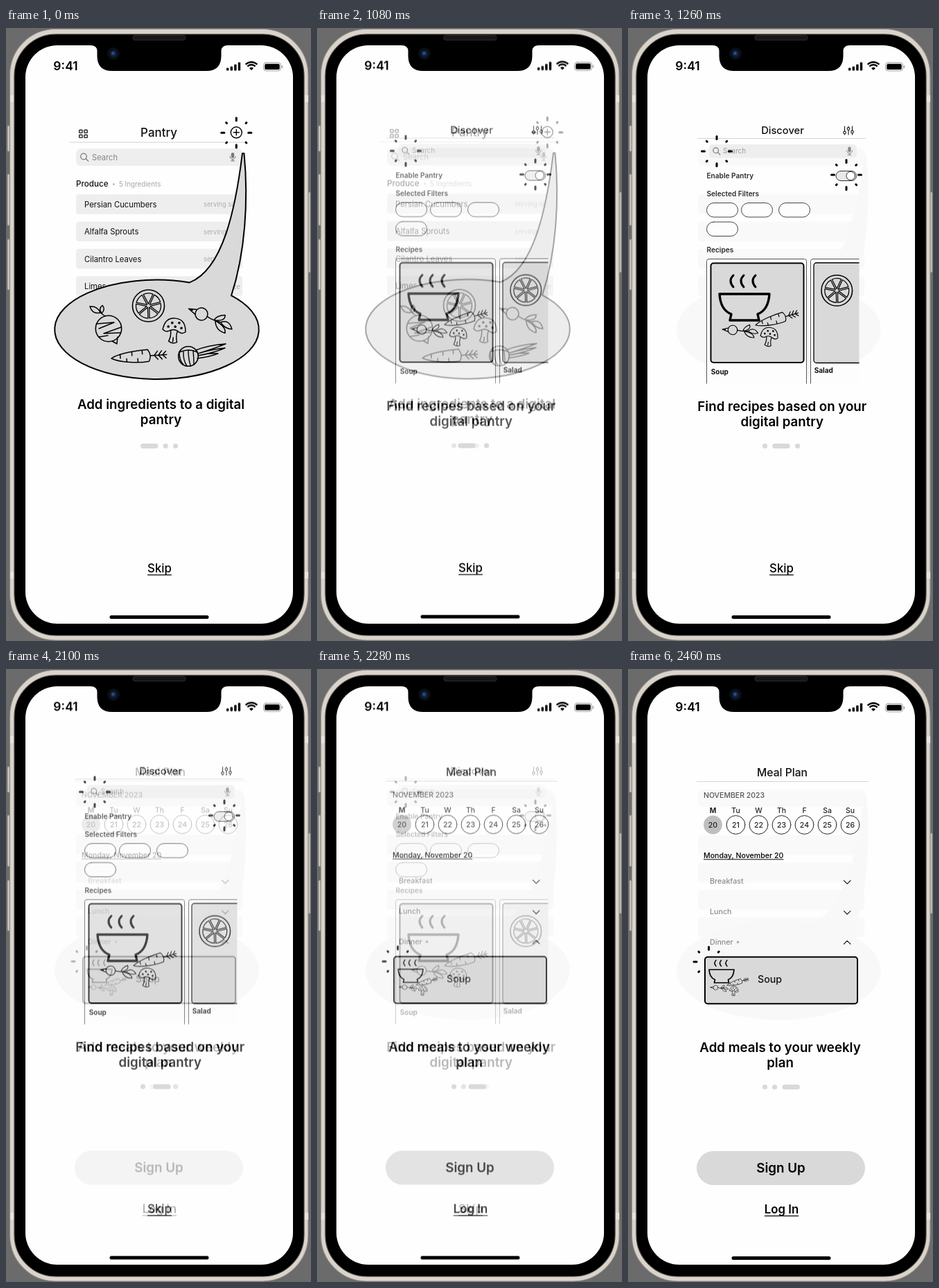
Write an HTML page with a canvas that moves like this. It is 440 px wide and 885 px high and loops after 4.5 s.

```html
<!DOCTYPE html>
<html lang="en">
<head>
<meta charset="utf-8">
<title>Pantry onboarding</title>
<style>
html, body { margin: 0; width: 100%; height: 100%; overflow: hidden; background: #6b6b6b; }
canvas { display: block; width: 440px; height: 885px; }
</style>
</head>
<body>
<canvas id="stage"></canvas>
<script>
const W = 440, H = 885, LOOP = 4500, TAU = Math.PI * 2;
const GREY = '#d9d9d9';
const scale = window.devicePixelRatio || 1;
const start = performance.now();
// Time and page position: the whole part is the page, the fraction is the dissolve.
const CUTS = [
  [0, 0], [1020, .32], [1080, .66], [1140, .86], [1200, .95], [1260, 1],
  [2100, 1.28], [2160, 1.45], [2220, 1.6], [2280, 1.72], [2400, 1.93], [2460, 2]
];
let c;

function setup(canvas) {
  canvas.width = W * scale;
  canvas.height = H * scale;
  const ctx = canvas.getContext('2d');
  ctx.scale(scale, scale);
  return ctx;
}

function layer(draw) {
  const canvas = document.createElement('canvas');
  c = setup(canvas);
  c.lineCap = c.lineJoin = 'round';
  draw();
  return canvas;
}

function text(s, x, y, size, weight = 400, color = '#000', align = 'left') {
  c.font = `${weight} ${size}px Inter, sans-serif`;
  c.textAlign = align;
  c.fillStyle = color;
  c.fillText(s, x, y);
}

function underline(s, x, y, size, weight, align, gap, thick) {
  text(s, x, y, size, weight, '#000', align);
  const w = c.measureText(s).width;
  c.fillRect(align === 'center' ? x - w / 2 : x, y + gap, w, thick);
}

function paint(fill, stroke, width = 1) {
  if (fill) { c.fillStyle = fill; c.fill(); }
  if (stroke) { c.strokeStyle = stroke; c.lineWidth = width; c.stroke(); }
}

function box(x1, y1, x2, y2, r, fill, stroke, width) {
  c.beginPath();
  c.roundRect(x1, y1, x2 - x1, y2 - y1, r);
  paint(fill, stroke, width);
}

function disc(x, y, r, fill, stroke, width) {
  c.beginPath();
  c.arc(x, y, r, 0, TAU);
  paint(fill, stroke, width);
}

function path(d, fill, stroke = '#000', width = 1.5) {
  const p = new Path2D(d);
  if (fill) { c.fillStyle = fill; c.fill(p); }
  if (stroke) { c.strokeStyle = stroke; c.lineWidth = width; c.stroke(p); }
}

function at(x, y, turn, size, draw) {
  c.save();
  c.translate(x, y);
  c.rotate(turn);
  c.scale(size, size);
  draw();
  c.restore();
}

function rays(x, y) {
  for (let i = 0; i < 8; i++) {
    at(x, y, i * Math.PI / 4, 1, () =>
      path(i % 2 ? 'M19.5 0H20.7' : 'M17.5 0H21.5', null, '#000', 3));
  }
}

function magnifier(x, y, r, color) {
  disc(x, y, r, null, color, 1.2);
  path(`M${x + r * .75} ${y + r * .75}l${r * .85} ${r * .85}`, null, color, 1.2);
}

function mic(x, y, color) {
  box(x - 2.2, y - 6, x + 2.2, y + 1.8, 2.2, color);
  path(`M${x - 4} ${y - .5}a4 4 0 0 0 8 0M${x} ${y + 3.6}v2.2M${x - 2.5} ${y + 5.8}h5`, null, color, 1);
}

// Food drawings

function orange() {
  disc(0, 0, 23, null, '#000', 1.6);
  for (let i = 0; i < 7; i++) {
    at(0, 0, i * TAU / 7 + .2, 1, () => {
      c.beginPath();
      c.moveTo(2.6, 0);
      c.arc(0, 0, 18, -.39, .39);
      c.closePath();
      paint(null, '#000', 1.3);
    });
  }
}

function radish() {
  path('M-20 0L-8.5 -3.5M-20 0L-8 4M-20 0H-14');
  disc(0, 0, 9, null, '#000', 1.5);
  path('M9 0Q20 2 30 0M20 1Q21 -7 32 -12Q36 -3 20 1ZM22 1Q28 14 42 12Q40 3 22 1ZM30 0Q40 -9 49 3Q39 7 30 0Z');
}

function mushroom() {
  path('M-16.5 0Q-15 -18 0 -18Q15 -18 16.5 0Q12 4 7 1Q0 -4 -7 1Q-12 4 -16.5 0Z');
  path('M-5 0Q-3 8 -6 16Q0 20 6 16Q3 8 5 0M0 10V16');
  for (const [x, y] of [[-9, -5], [-4, -11], [1, -6], [6, -12], [10, -5]]) disc(x, y, 1.8, '#000');
}

function carrot() {
  path('M0 0C12 -7 40 -9 53 -9Q59 0 54 8C40 10 12 7 0 0ZM13 -5V1M22 7V2M30 -7V-2M38 8V3M45 -8V-3');
  path('M57 0H80M62 0l5 -6M62 0l5 6M68 0l5 -6M68 0l5 6M74 0l5 -5M74 0l5 5');
}

function beet() {
  path('M153 452L160 456L161 446');
  disc(148, 434, 18.7, null, '#000', 1.6);
  path('M143 416L136 411Q125 414 121 402Q132 401 136 411M138 412Q133 405 139 400.5Q144 406 138 412');
  path('M131 427L156 425L134 434M166 432L141 441L165 440M134 446L147 444', null, '#000', 1.5);
}

function onion() {
  disc(263, 474, 14.3, null, '#000', 1.6);
  path('M250 468Q264 462 276 468M250 468Q250 480 256 486M256 466Q255 479 261 488M263 465Q263 477 266 487M270 466Q271 477 271 485', null, '#000', 1.4);
  path('M274 465Q292 458 317 456Q300 463 277 470M277 470Q296 464 316 462Q300 469 277 473M277 473Q292 469 306 470Q293 475 276 477', null, '#000', 1.4);
}

function soup() {
  for (const x of [152, 167, 184]) path(`M${x} 357Q${x - 8} 365 ${x} 374`, null, '#000', 3);
  path('M132 384H204C203 399 198 409 187 413L189 422H147L149 413C138 409 133 399 132 384Z', null, '#000', 3.4);
  at(184, 429, -.28, .8, carrot);
  at(151, 436, .06, .75, radish);
  at(203.5, 446, .15, .76, mushroom);
}

function bubble(fill, stroke) {
  c.beginPath();
  c.ellipse(217.5, 435.3, 147.3, 71.7, 0, -.75, TAU - 1.243);
  c.bezierCurveTo(313, 348, 331, 262, 341, 181);
  c.lineTo(343.5, 181);
  c.bezierCurveTo(350, 250, 345, 325, 325, 386.5);
  c.closePath();
  paint(fill, stroke, 2);
}

const ROWS = ['Persian Cucumbers', 'Alfalfa Sprouts', 'Cilantro Leaves', 'Limes'];

function rowBoxes(fill) {
  box(101, 174, 341, 199, 7, fill);
  ROWS.forEach((_, i) => box(101, 240 + i * 39.4, 341, 268.7 + i * 39.4, 4, fill));
}

// Page parts

function statusBar() {
  text('9:41', 86, 61.3, 17.5, 600, '#000', 'center');
  [4, 6, 9, 12].forEach((h, i) => box(318 + i * 5.6, 61.5 - h, 321.4 + i * 5.6, 61.5, 1, '#000'));
  for (const r of [4.2, 8, 11.8]) {
    c.beginPath();
    c.arc(354, 61, r, -Math.PI * .75, -Math.PI * .25);
    if (r < 5) { c.lineTo(354, 61); paint('#000'); }
    else { c.lineCap = 'butt'; paint(null, '#000', 2.4); c.lineCap = 'round'; }
  }
  box(371.5, 50, 396.5, 61.8, 3.6, null, '#9a9a9a', 1);
  box(373.2, 51.7, 394.8, 60.1, 2.2, '#000');
  box(397.8, 54, 399.2, 58, 1, '#9a9a9a');
}

function base(index, title, x, y) {
  c.fillStyle = '#fefefe';
  c.fillRect(0, 0, W, H);
  if (index) { rowBoxes('#f9f9f9'); bubble('#f8f8f8'); }
  statusBar();
  title.forEach((line, i) => text(line, x, y + i * 22.7, 18.7, 600, '#000', 'center'));
  for (let k = 0; k < 3; k++) {
    if (k !== index) disc(k < index ? 197.5 + 14 * k : 215.8 + 14.4 * k, 603.5, 3.6, GREY);
  }
  if (index < 2) underline('Skip', 221.5, 786, 16.8, 500, 'center', 3, 1.2);
  box(149.5, 848, 292.5, 853, 2.5, '#000');
}

function rule(x1, x2, y) {
  c.fillStyle = '#d4d4d4';
  c.fillRect(x1, y, x2 - x1, 1);
}

function pantry() {
  base(0, ['Add ingredients to a digital', 'pantry'], 223.5, 549.7);
  rule(92, 345, 164.5);
  for (const x of [105.7, 112.9]) for (const y of [147.2, 154.2]) box(x, y, x + 4.4, y + 4.2, .8, null, '#222', 1.4);
  text('Pantry', 220.5, 157, 16.9, 500, '#111', 'center');
  rowBoxes('#eee');
  magnifier(112, 185.5, 4.3, '#777');
  text('Search', 124, 190.5, 11.2, 400, '#858585');
  mic(327, 186, '#777');
  text('Produce', 101, 228.7, 11.7, 500, '#111');
  disc(155.5, 225.5, 1.5, '#bbb');
  text('5 Ingredients', 163, 228.5, 9.8, 400, '#a6a6a6');
  ROWS.forEach((name, i) => {
    const y = 258.7 + i * 39.4;
    text(name, 113, y, 11.3, 400, '#111');
    text('serving size', 285, y - .4, 9.3, 400, '#adadad');
  });
  bubble(GREY, '#000');
  rays(332.3, 151.3);
  disc(332.3, 150.8, 8, null, '#000', 1.4);
  path('M328.3 150.8h8M332.3 146.8v8', null, '#000', 1.4);
  at(205.5, 401, 0, 1, orange);
  beet();
  at(282, 413, .4, 1, radish);
  at(242.5, 437, .12, 1, mushroom);
  at(152, 477, -.07, 1, carrot);
  onion();
}

function discover() {
  base(1, ['Find recipes based on your', 'digital pantry'], 222.3, 552.7);
  text('Discover', 223, 153.3, 14.7, 500, '#111', 'center');
  rule(100, 343, 159);
  [[312.5, 151], [318, 145.5], [323.5, 150]].forEach(([x, y]) => {
    path(`M${x} 142V154`, null, '#222', 1.2);
    disc(x, y, 1.8, '#fff', '#222', 1.2);
  });
  box(117, 168, 330, 187.5, 5, '#eee');
  magnifier(126.7, 176.7, 3.8, '#777');
  text('Search', 137, 181.3, 10, 400, '#999');
  mic(319.5, 177.5, '#888');
  rays(128, 178);
  text('Enable Pantry', 113.5, 217, 10.1, 600, '#2b2b2b');
  text('Selected Filters', 113.5, 243, 10.1, 600, '#2b2b2b');
  text('Recipes', 113.5, 324.3, 10.1, 600, '#2b2b2b');
  box(300, 206.5, 329.5, 220.5, 7, '#e8e8e8', '#333', 1);
  disc(321.2, 213.5, 6.2, '#fff', '#333', 1);
  rays(315, 212);
  for (const [x, y] of [[113.5, 252.5], [163.5, 252.5], [217.5, 252.5], [113.5, 280]]) {
    box(x, y, x + 45, y + 20.5, 10.2, '#fdfdfd', '#444', 1);
  }
  c.save();
  c.beginPath();
  c.rect(100, 325, 233.5, 188.5);
  c.clip();
  box(113.5, 333.5, 257.5, 560, 3, '#fdfdfd', '#555', 1);
  box(263.5, 333.5, 407.5, 560, 3, '#fdfdfd', '#555', 1);
  box(119.5, 339.5, 253.5, 483, 4, GREY, '#000', 2);
  box(268, 339, 402, 483.5, 4, GREY, '#000', 1.3);
  at(301.3, 379, 0, .97, orange);
  soup();
  text('Soup', 119.7, 499.7, 10, 700, '#111');
  text('Salad', 268.7, 498, 10, 700, '#111');
  c.restore();
}

function mealPlan() {
  base(2, ['Add meals to your weekly', 'plan'], 219.5, 552.7);
  text('Meal Plan', 222.5, 154.7, 15.7, 500, '#111', 'center');
  rule(99, 347, 162);
  text('NOVEMBER 2023', 109, 186, 10.5, 500, '#555');
  ['M', 'Tu', 'W', 'Th', 'F', 'Sa', 'Su'].forEach((day, i) => {
    const x = 122.5 + 33 * i;
    text(day, x, 208, 10.4, i ? 500 : 700, '#222', 'center');
    disc(x, 225, 13.4, i ? '#fff' : '#bfbfbf', i ? '#222' : null, 1);
    text(String(20 + i), x, 228.7, 10.6, 500, '#222', 'center');
  });
  underline('Monday, November 20', 109, 272.7, 10.6, 500, 'left', 1.7, 1);
  ['Breakfast', 'Lunch', 'Dinner'].forEach((meal, i) => {
    text(meal, 118, 310.3 + 43.8 * i, 10.7, 500, '#8c8c8c');
    path(i < 2 ? `M311.5 ${305.5 + 43.8 * i}l4.7 4.7l4.7 -4.7` : 'M311.5 397l4.7 -4.7l4.7 4.7', null, '#222', 1.2);
  });
  disc(158.5, 394.3, 1.9, '#b5b5b5');
  rays(116.5, 422.7);
  box(111, 415.7, 331, 483.2, 4, GREY, '#000', 2);
  at(51, 242, 0, .5, soup);
  text('Soup', 187, 453.2, 14.2, 500, '#111');
  box(99, 696, 342, 745, 24.5, GREY);
  text('Sign Up', 220.5, 727.3, 18.8, 600, '#000', 'center');
  underline('Log In', 221.5, 786, 16.8, 600, 'center', 3, 1.2);
}

function phone() {
  const body = '#d9d3cc', edge = '#8b8782';
  c.fillStyle = '#6b6b6b';
  c.fillRect(0, 0, W, H);
  for (const [y1, y2] of [[141, 178], [211, 285], [305, 378]]) box(2, y1, 8, y2, 1, '#c9c4be', edge, 1);
  box(432, 237, 439, 353, 1, '#c9c4be', edge, 1);
  box(5.5, 1.5, 436, 884, 66, body, edge, 1.2);
  c.fillStyle = '#e6e2dc';
  for (const y of [97, 785]) {
    c.fillRect(6, y, 6, 10);
    c.fillRect(430, y, 6, 10);
  }
  box(12, 9, 430, 877, 60, '#000', '#4a4744', 1.2);
  // Opening for the display
  c.globalCompositeOperation = 'destination-out';
  box(28, 25, 414, 860, 46, '#000');
  c.globalCompositeOperation = 'source-over';
  path('M122 24V25Q131 25 131.5 33V41Q132 62 153 62H289Q310 62 310.5 41V33Q311 25 320 25V24Z', '#000', null);
  box(183, 10.5, 259, 17.5, 3, '#161616', '#2a2a2a', 1);
  disc(155, 37, 9, '#0b0e15');
  disc(155, 37, 5, '#12213f');
  disc(154.5, 36.5, 2.2, '#28508f');
}

const pages = [pantry, discover, mealPlan].map(layer);
const shell = layer(phone);
const view = setup(document.getElementById('stage'));

function frame() {
  const t = (performance.now() - start) % LOOP;
  const pos = CUTS.findLast(cut => cut[0] <= t)[1];
  const page = Math.floor(pos), mix = pos - page;
  const lift = mix ? -.6 : 0;
  c = view;
  c.fillStyle = '#fefefe';
  c.fillRect(0, 0, W, H);
  c.drawImage(pages[page], 0, lift, W, H);
  if (mix) {
    c.globalAlpha = mix;
    c.drawImage(pages[page + 1], 0, lift, W, H);
    c.globalAlpha = 1;
  }
  const x = 194 + 14.2 * pos;
  box(x, 600 + lift, x + 25.5, 607 + lift, 3.5, GREY);
  c.drawImage(shell, 0, 0, W, H);
  requestAnimationFrame(frame);
}
frame();
</script>
</body>
</html>
```
